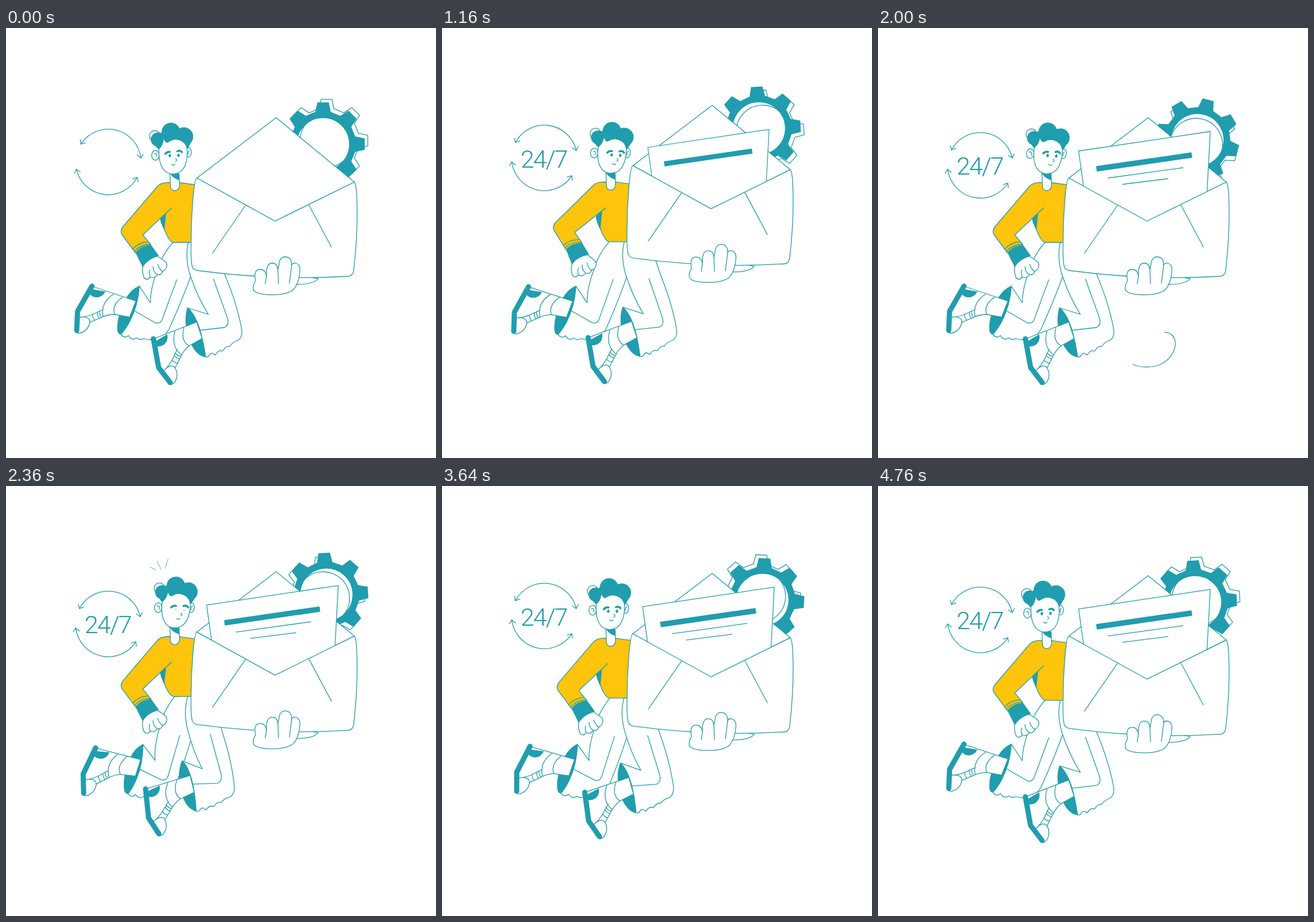
Recreate the animation shown at these times as an HTML page. Size 748 by 748 pixels, loop 4.8 s.

```html
<!DOCTYPE html>
<html lang="en">
<head>
<meta charset="utf-8">
<title>Mail support</title>
<style>
  html, body { margin: 0; height: 100%; overflow: hidden; background: #fff; }
  svg { display: block; width: 100vw; height: 100vh; }
  svg { fill: #fff; stroke: #209dae; stroke-width: 1.3; stroke-linejoin: round; stroke-linecap: round; }
  .line { fill: none; }
  .dark { fill: #209dae; }
  .shirt { fill: #ffc40c; }
  text { font: 300 43px Roboto, sans-serif; letter-spacing: -2px; fill: #209dae; stroke: none; text-anchor: middle; }
</style>
</head>
<body>
<svg viewBox="0 0 748 748">
  <defs>
    <g id="foot">
      <path d="M149 449L226 475L215 503L188 498Q175 499 167 503L146 512Q143 527 128 531L122 530L125 492Z"/>
      <path class="line" d="M187 463Q164 478 169 502M203 468Q183 482 189 498M128 503Q146 501 146 512M130 503Q142 502 151 498L169 490M151 498Q150 503 154 508M159 494Q158 500 162 505M163 492Q162 498 166 503"/>
      <path class="dark" d="M148 455L172 459Q167 468 157 468Q148 467 145 460Z"/>
      <path class="line" stroke-width="9" d="M149.500 449L124.500 493L123 526"/>
    </g>
  </defs>

  <g id="cycle">
    <g id="arrows"></g>
    <g id="label"><text x="-1" y="16.500">24/7</text></g>
  </g>

  <g id="body">
    <g id="legLeft">
      <path d="M293 370Q270 395 262 425Q251 455 251 478L232 449Q228 500 200 533Q206 541 213 535Q219 545 227 539Q234 544 240 540Q248 544 258 541Q275 538 283 525Q308 470 322 430L335 370Z"/>
      <path class="line" d="M297 438L272 506Q269 515 260 513L222 491"/>
      <path class="dark" d="M232 449Q205 460 195 510Q192 534 200 532Q228 500 232 449Z"/>
      <use href="#foot"/>
    </g>
    <g id="legRight">
      <path d="M318 370Q310 398 321 432Q334 470 352 498L316 487Q337 505 347 572Q352 574 355 567Q359 564 364 569Q369 559 377 562Q383 552 389 554Q393 547 404 543Q412 537 410 524Q402 480 381 430L360 370Z"/>
      <path class="line" d="M361 437L385 504Q389 517 380 521L336 526"/>
      <path class="dark" d="M316 487Q338 505 347 572Q330 570 318 540Q309 508 316 487Z"/>
      <use href="#foot" transform="translate(256 541) rotate(-40) translate(-149 -449)"/>
    </g>
    <path class="shirt" d="M275 270Q285 268 302 269L331 273L325 373L291 373Q284 372 276 352Q270 335 268 320Z"/>
    <path class="dark" d="M278 320L268 330Q270 340 275 350Z"/>
    <g id="arm">
      <path class="shirt" d="M284 269Q269 268 262 277L203 346Q198 353 202 360L226 392L252 377L238 360L288 313"/>
      <path class="line" d="M220 385Q230 373 247 372M223 389Q233 377 251 376"/>
      <path class="dark" d="M226 391Q235 379 252 378L265 396Q248 401 238 415Z"/>
      <path d="M238 415Q246 402 263 397Q272 402 279 408Q282 419 273 423Q270 431 263 429Q258 437 251 433Q245 441 240 434Q236 424 238 415Z"/>
      <path class="line" d="M250 421Q248 428 251 433M256 415Q255 423 263 429M264 411Q266 419 273 424"/>
    </g>
    <path d="M285 248L286 276Q287 283 294 283Q301 282 302 274L301 254Z"/>
    <path class="dark" d="M286 253L301 254L301 264Q291 261 286 253Z"/>
    <g id="head">
      <circle cx="259" cy="188" r="9.500"/>
      <ellipse cx="260" cy="221.500" rx="6.500" ry="8.500"/><ellipse cx="317.500" cy="216" rx="5" ry="8.500"/>
      <g class="dark">
        <circle cx="264" cy="194" r="11.500"/><circle cx="287" cy="181" r="15.500"/>
        <circle cx="309.500" cy="189" r="15.500"/><circle cx="277" cy="190" r="10"/>
        <path d="M256 200L267 212L316 209L321 199Z"/>
      </g>
      <path d="M266 210Q273 205 274 191Q277 199 281 199Q292 191 302 195Q312 198 315 209Q317 240 303 250Q290 258 278 250Q265 240 266 210Z"/>
      <path class="line" d="M258 219Q263 217 262 224M319 213Q316 214 317 220"/>
      <g id="face">
        <path class="line" stroke-width="3.500" d="M277 219Q280 215 285 215.500M298 214.500Q303 212 306 216"/>
        <g id="eyes" class="dark" stroke="none">
          <ellipse cx="285" cy="222" rx="2.200" ry="2.800"/><ellipse cx="300" cy="221.500" rx="2.200" ry="2.800"/>
        </g>
        <path class="line" d="M295 227Q299 230 295 232M288 237Q291 240 294 237"/>
      </g>
    </g>
    <path id="spark" class="line" stroke-width=".8" d="M261 153L251 148M270 152L263 138M277 150L282 134"/>
  </g>

  <g id="mail">
    <g id="gear"><path id="gearBack" transform="translate(3 -3)"/><path id="gearFront" class="dark" transform="translate(-3 3)"/></g>
    <path d="M332 261L470 156L606 268L468 336Z"/>
    <g id="letter">
      <path d="M349 214L578 180L570 330L368 350Z"/>
      <path class="line" stroke-width="9.500" stroke-linecap="butt" d="M380 245L546 221"/>
      <path id="lineA" class="line" d="M400 261L531 243"/>
      <path id="lineB" class="line" d="M425 272L505 262"/>
    </g>
    <path d="M505 446Q536 446 543 436L510 430Z"/>
    <path d="M332 261Q328 262 325 300Q322 335 322 370Q321 405 324 415Q326 421 334 422Q470 440 592 432Q604 433 605 420Q613 350 610 290Q609 272 606 268L468 336Z"/>
    <path class="line" d="M417 308L359 392M527 308L566 381"/>
    <path d="M434 440Q430 420 442 420Q452 420 453 432L453 424Q454 409 463 409Q472 409 473 420L475 411Q476 398 486 398Q497 399 497 412Q499 408 504 409Q513 412 511 425Q509 445 500 455Q488 465 458 464Q430 463 430 453Q430 446 434 440Z"/>
    <path class="line" d="M453 432L451 445M473 420L474 445M497 412L493 444"/>
  </g>

  <path id="swirl" class="line" d="M562 463Q572 488 560 512Q543 547 517 554Q493 557 489 541Q489 527 504 530Q519 535 517 553Q513 575 490 586Q465 594 443 585"/>
</svg>
<script>
const LOOP = 4800, STEP = 40;
const $ = id => document.getElementById(id);
const place = (id, transform) => $(id).setAttribute('transform', transform);
const clamp = x => Math.min(1, Math.max(0, x));
const smooth = x => (1 - Math.cos(Math.PI * clamp(x))) / 2;
const ramp = (t, start, length) => smooth((t - start) / length);
const cubic = x => x < .5 ? 4 * x ** 3 : 1 - 4 * (1 - x) ** 3;

// cubic-bezier(.25, .1, .25, 1)
function ease(x) {
  const bezier = (u, a, b) => 3 * a * u * (1 - u) ** 2 + 3 * b * u * u * (1 - u) + u ** 3;
  let low = 0, high = 1;
  for (let i = 0; i < 20; i++) {
    const mid = (low + high) / 2;
    if (bezier(mid, .25, .25) < x) low = mid; else high = mid;
  }
  return bezier(low, .1, 1);
}

// Values spaced evenly in time, joined by an easing
function keyed(t, values, easing) {
  const p = t / LOOP * (values.length - 1), i = Math.floor(p);
  return values[i] + (values[i + 1] - values[i]) * easing(p - i);
}

// Show the part of a path between two fractions
function trim(id, from, to) {
  const path = $(id), length = path.getTotalLength();
  path.style.visibility = to - from > .005 ? 'inherit' : 'hidden';
  path.style.strokeLinecap = 'butt';
  path.style.strokeDasharray = `0 ${from * length} ${(to - from) * length} ${length * 2}`;
}

function polar(radius, degrees) {
  const a = degrees * Math.PI / 180;
  return `${(radius * Math.cos(a)).toFixed(2)} ${(radius * Math.sin(a)).toFixed(2)}`;
}

function gearPath() {
  const points = [];
  for (let a = 0; a < 360; a += 45)
    points.push(polar(57, a - 13), polar(72.5, a - 7.5), polar(72.5, a + 7.5), polar(57, a + 13));
  return `M${points.join('L')}ZM46 0A46 46 0 1 0 -46 0A46 46 0 1 0 46 0Z`;
}

function arrowArc(start, end) {
  const head = (angle, flip) =>
    `<path class="line" d="M51.5 -6L57 0L62 -6" transform="rotate(${angle}) scale(1 ${flip})"/>`;
  return `<path class="line" d="M${polar(57, start)}A57 57 0 0 1 ${polar(57, end)}"/>` + head(start, -1) + head(end, 1);
}

for (const id of ['gearBack', 'gearFront']) {
  $(id).setAttribute('d', gearPath());
  $(id).setAttribute('fill-rule', 'evenodd');
}
$('arrows').innerHTML = arrowArc(208, 347) + arrowArc(33, 173);

function draw(t) {
  const sway = keyed(t, [0, -1, 1, -1, 0, -1, 0], smooth);
  const jump = ramp(t, 800, 400) - ramp(t, 1200, 400);
  const turn = ramp(t, 0, 800) - ramp(t, 3200, 800);

  place('body', `translate(0 ${7 * sway})`);
  place('legLeft', `rotate(${4.2 * sway} 338 367)`);
  place('legRight', `rotate(${-4.6 * sway} 336 366)`);
  place('arm', `rotate(${5 * jump} 275 275)`);
  place('head', `rotate(${5.5 * turn} 294 270)`);
  place('face', `translate(${5.5 * turn} 0)`);
  const blink = Math.max(0, 1 - Math.abs(t - 2360) / 120);
  place('eyes', `translate(0 ${222 * .9 * blink}) scale(1 ${1 - .9 * blink})`);
  $('spark').style.opacity = ramp(t, 2160, 200) - ramp(t, 2400, 200);

  place('mail', `translate(0 ${7 * sway - 21 * jump})`);
  place('gear', `translate(554.5 199) rotate(${t / LOOP * 360})`);
  place('letter', `translate(463.5 409) scale(${.3 + .7 * ramp(t, 800, 460)}) translate(-463.5 -409)`);
  $('letter').style.visibility = t < 800 ? 'hidden' : 'inherit';
  trim('lineA', 0, ramp(t, 1200, 540));
  trim('lineB', 0, ramp(t, 1340, 540));

  place('cycle', `translate(178 ${233 + 7 * keyed(t, [0, -1, 1, -1, 0], ease)})`);
  place('arrows', `rotate(${180 + 180 * cubic(clamp(t / 800))})`);
  place('label', `scale(${ramp(t, 500, 400)})`);

  const swirlTime = t >= 1200 && t < 3600 ? t % 1200 : 0;
  trim('swirl', ramp(swirlTime, 450, 650), ramp(swirlTime, 0, 505));
}

function tick() {
  draw(Math.floor(performance.now() % LOOP / STEP) * STEP);
  requestAnimationFrame(tick);
}
tick();
</script>
</body>
</html>
```
